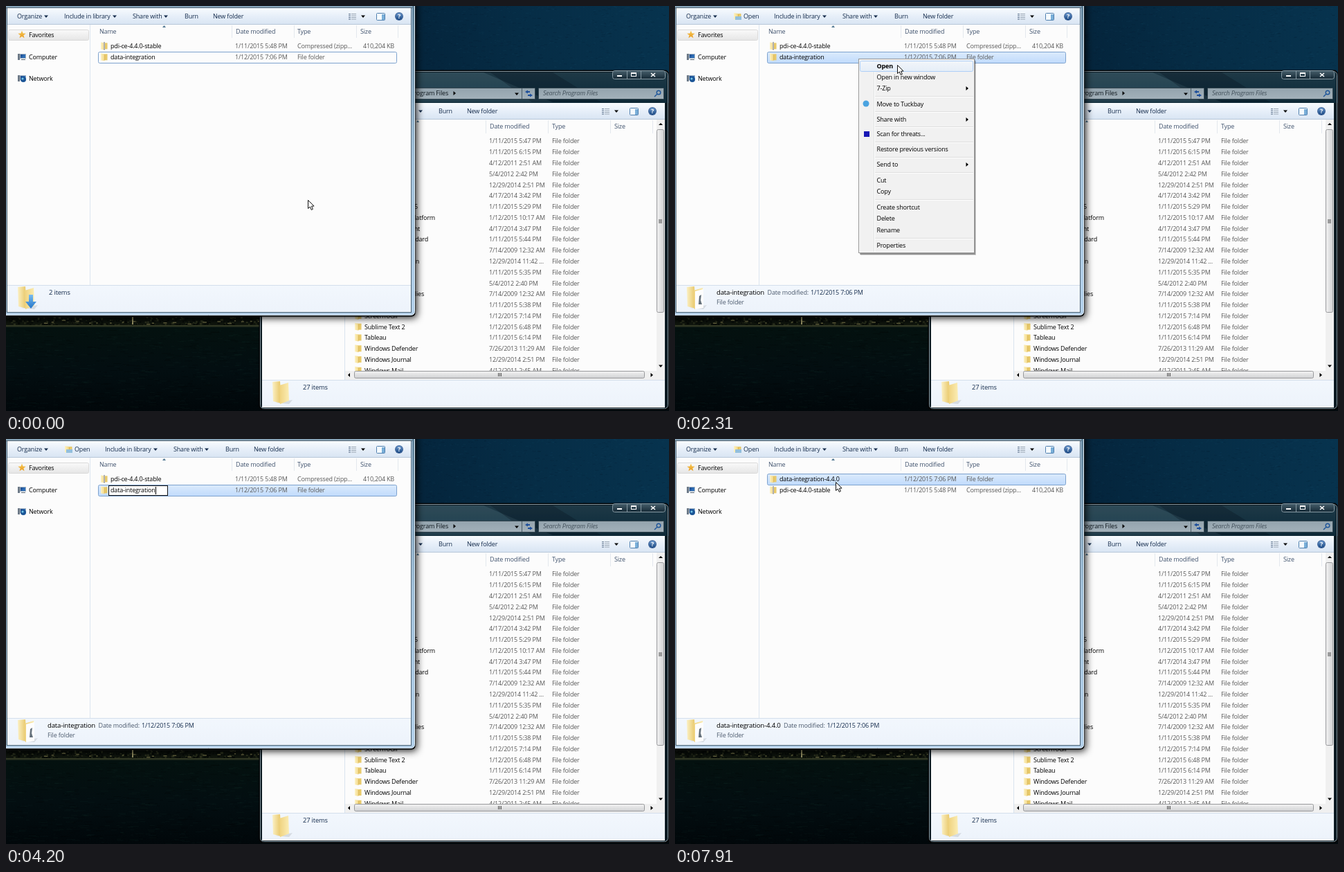
An HTML page with a canvas that plays this animation: 958 px wide and 585 px high, repeating every 8000 ms.

```html
<!DOCTYPE html>
<html lang="en">
<head>
<meta charset="utf-8">
<title>Renaming a folder</title>
<style>
html, body { margin: 0; width: 100%; height: 100%; overflow: hidden; background: #03121b; }
canvas { display: block; }
</style>
</head>
<body>
<canvas id="stage" width="958" height="585"></canvas>
<script>
const W = 958, H = 585, LOOP = 8000, STEP = 70;
const screen = document.getElementById('stage').getContext('2d');
let g = screen;

const INK = '#000', NAVY = '#152c4c', GREY = '#585858', HEAD = '#40536e';

// ---- drawing helpers ----
function box(x, y, w, h, fill) { g.fillStyle = fill; g.fillRect(x, y, w, h); }
function frame(x, y, w, h, color) { g.strokeStyle = color; g.lineWidth = 1; g.strokeRect(x + .5, y + .5, w - 1, h - 1); }
function shade(x0, y0, x1, y1, ...stops) {
  const s = g.createLinearGradient(x0, y0, x1, y1);
  stops.forEach((c, i) => s.addColorStop(i / (stops.length - 1), c));
  return s;
}
function down(x, y, w, h, ...stops) { box(x, y, w, h, shade(0, y, 0, y + h, ...stops)); }
function round(x, y, w, h, r, fill, line) {
  g.beginPath(); g.roundRect(x + .5, y + .5, w - 1, h - 1, r);
  if (fill) { g.fillStyle = fill; g.fill(); }
  if (line) { g.strokeStyle = line; g.lineWidth = 1; g.stroke(); }
}
function poly(fill, ...p) {
  g.beginPath();
  for (let i = 0; i < p.length; i += 2) g.lineTo(p[i], p[i + 1]);
  g.closePath(); g.fillStyle = fill; g.fill();
}
function disc(x, y, r, fill) { g.beginPath(); g.arc(x, y, r, 0, 7); g.fillStyle = fill; g.fill(); }
function setFont(style = '', size = 9) {
  g.font = `${style} ${size}px "Open Sans", "Noto Sans", sans-serif`;
  g.letterSpacing = '-0.18px';
}
// y is the middle of the line
function text(s, x, y, color = INK, align = 'left', style = '', size = 9) {
  setFont(style, size); g.textAlign = align; g.fillStyle = color; g.fillText(s, x, Math.round(y + 3));
}
function arrow(x, y, color = INK) { poly(color, x - 3, y - 1.5, x + 3, y - 1.5, x, y + 2); }
function arrowRight(x, y, color = INK) { poly(color, x - 1.5, y - 3, x + 2, y, x - 1.5, y + 3); }
function seeded(n) { return () => (n = n * 16807 % 2147483647) / 2147483647; }

// ---- icons ----
function folder(x, y, w = 10, h = 11) {
  box(x + w * .45, y + 1, w * .5, h - 2, shade(x, 0, x + w, 0, '#f7e294', '#e5c460'));
  poly(shade(x, 0, x + w * .6, 0, '#fdf3c6', '#f0d27a'), x, y, x + w * .55, y + h * .1, x + w * .55, y + h, x, y + h * .92);
  box(x + w * .55, y + 2, .7, h - 3, '#cda544');
}
function zip(x, y) {
  folder(x, y);
  box(x + 4, y, 2, 11, '#77797c');
  for (let i = 0; i < 5; i++) box(x + 4, y + 1 + i * 2, 2, 1, '#e8e8e8');
}
function bigFolder(x, y) {
  poly('rgba(0,0,0,.1)', x + 4, y + 31, x + 29, y + 27, x + 24, y + 33);
  poly(shade(x, 0, x + 12, 0, '#fbf0c4', '#e8c768'), x, y + 1, x + 11, y, x + 13, y + 32, x + 1, y + 29);
  poly(shade(x + 9, 0, x + 24, 0, '#eed07a', '#fbedb4'), x + 10, y + 6, x + 23, y + 2, x + 24, y + 28, x + 11, y + 33);
}
function star(x, y) {
  const p = [];
  for (let i = 0; i < 10; i++) {
    const r = i % 2 ? 2.5 : 6, a = i * Math.PI / 5 - Math.PI / 2;
    p.push(x + r * Math.cos(a), y + r * Math.sin(a));
  }
  poly(shade(0, y - 6, 0, y + 6, '#f6c64b', '#e89a25'), ...p);
}
function monitor(x, y) {
  box(x, y, 3, 9, '#6d7a88');
  box(x + 3, y, 9, 7, '#a5b4c2');
  box(x + 4, y + 1, 7, 5, shade(x, y, x + 8, y + 5, '#0a2766', '#2f6fb8'));
  box(x + 5, y + 8, 6, 1, '#5c6874');
}
function toolIcons(x, y) {
  for (let i = 0; i < 4; i++) {
    box(x - 21, y - 4 + i * 2.5, 3, 1.2, '#71849b');
    box(x - 17, y - 4 + i * 2.5, 7, 1, '#9ba7b4');
  }
  arrow(x, y);
  round(x + 19, y - 5, 13, 11, 1, '#f5fbff', '#4f7fae');
  box(x + 27, y - 3, 4, 8, '#79aed8');
  disc(x + 52, y, 6, '#43679a');
  disc(x + 52, y, 5, shade(0, y - 5, 0, y + 5, '#6e9bd0', '#164681'));
  text('?', x + 52, y, '#fff', 'center', 'bold');
}
function pointer(x, y) {
  g.save(); g.translate(x + .5, y + .5); g.beginPath();
  [[0, 0], [0, 12], [2.8, 9.5], [4.8, 14], [6.8, 13], [5, 8.7], [8.6, 8.5]].forEach(p => g.lineTo(...p));
  g.closePath();
  g.fillStyle = '#fff'; g.fill();
  g.strokeStyle = '#111'; g.lineWidth = 1; g.stroke();
  g.restore();
}

// ---- desktop and rear window ----
function desktop() {
  const rnd = seeded(77);
  box(0, 0, W, H, '#02090d');
  box(560, 0, 398, 140, shade(570, 100, 958, 0, '#04233a', '#062d46', '#07334e'));
  for (let i = 0; i < 700; i++)
    box(585 + rnd() * 373, rnd() * 94, 2 + rnd() * 3, 1, rnd() < .5 ? 'rgba(0,12,25,.12)' : 'rgba(50,130,165,.06)');
  down(0, 440, 400, 22, '#020404', '#070c08', '#12180f');
  for (let i = 0; i < 330; i++)
    box(rnd() * 370, 449 + rnd() * 12, 1 + rnd() * 3, 1 + rnd() * 2, rnd() < .65 ? '#050906' : '#2a2f1c');
  for (let x = 55; x < 366; x += 7 + rnd() * 15) box(x, 453 + rnd() * 6, 2 + rnd() * 4, 1.5, '#5f5d3b');
  box(182, 449, 2, 11, '#928d62');
  down(0, 461, 370, 3, '#3d4229', '#161f17');
  down(0, 464, 370, 121, '#04110f', '#030e11', '#01070a');
  for (let i = 0; i < 700; i++)
    box(rnd() * 370, 466 + rnd() * 119, 3 + rnd() * 10, 1, rnd() < .5 ? 'rgba(0,2,4,.25)' : 'rgba(30,62,56,.13)');
}

const dates = ['1/11/2015 5:47 PM', '1/11/2015 6:15 PM', '4/12/2011 2:51 AM', '5/4/2012 2:42 PM',
  '12/29/2014 2:51 PM', '4/17/2014 3:42 PM', '1/11/2015 5:29 PM', '1/12/2015 10:17 AM', '4/17/2014 3:47 PM',
  '1/11/2015 5:44 PM', '7/14/2009 12:32 AM', '12/29/2014 11:42 ...', '1/11/2015 5:35 PM', '5/4/2012 2:40 PM',
  '7/14/2009 12:32 AM', '1/11/2015 5:38 PM', '1/12/2015 7:14 PM', '1/12/2015 6:48 PM', '1/11/2015 6:14 PM',
  '7/26/2013 11:29 AM', '12/29/2014 2:51 PM', '4/12/2011 2:45 AM'];
const lastNames = ['ScreenToGif', 'Sublime Text 2', 'Tableau', 'Windows Defender', 'Windows Journal', 'Windows Mail'];
const tails = [['5', 595, 6], ['latform', 620, 7], ['ht', 598, 8], ['dard', 610, 9], ['n', 597, 11], ['lies', 604, 14]];

function bar(x, y, w, h, vertical) {
  round(x, y, w, h, 2, vertical ? shade(x, 0, x + w, 0, '#f4f4f4', '#cfd0d2') : shade(0, y, 0, y + h, '#f4f4f4', '#cfd0d2'), '#97989b');
  for (let i = -2; i <= 2; i += 2)
    vertical ? box(x + 3, y + h / 2 + i, 5, 1, '#555') : box(x + w / 2 + i, y + 3, 1, 5, '#555');
}
function rearWindow() {
  round(365, 92, 593, 492, 5, '#030506');
  round(367, 94, 590, 488, 5, '#0c1a22', '#8798a1');
  down(369, 96, 586, 44, '#1f3946', '#143140', '#0d2836');
  poly('rgba(130,165,178,.16)', 590, 96, 690, 96, 790, 139, 590, 139);
  poly('rgba(0,10,20,.25)', 700, 96, 790, 96, 860, 139, 760, 139);
  round(876, 93, 77, 13, 3, shade(0, 93, 0, 106, '#4a626f', '#132733'), '#8598a2');
  box(897, 94, 1, 11, '#8598a2'); box(917, 94, 1, 11, '#8598a2');
  box(883, 100, 7, 2, '#fff');
  frame(903, 97, 8, 5, '#fff'); box(903, 96, 8, 1, '#fff');
  g.strokeStyle = '#fff'; g.lineWidth = 1.6; g.beginPath();
  g.moveTo(932, 97); g.lineTo(938, 102); g.moveTo(938, 97); g.lineTo(932, 102); g.stroke();

  const field = shade(0, 118, 0, 135, '#93a3ad', '#a3b1ba');
  round(500, 118, 265, 17, 1, field, '#33454f');
  box(745, 119, 1, 15, '#4a5c67');
  text('Program Files', 639, 126, '#0c151b', 'right'); arrowRight(648, 126); arrow(738, 127);
  for (const [x, y, s] of [[754, 124, -1], [757, 129, 1]])
    poly('#1d4f9c', x + s * 4, y, x, y - 2.5, x, y - 1, x - s * 3, y - 1, x - s * 3, y + 1, x, y + 1, x, y + 2.5);
  round(769, 118, 182, 17, 1, field, '#33454f');
  text('Search Program Files', 776, 126, '#45535d', 'left', 'italic');
  g.strokeStyle = '#1f569a'; g.lineWidth = 1.4; g.beginPath(); g.arc(943, 125, 2.8, 0, 7);
  g.moveTo(941, 127); g.lineTo(937, 131); g.stroke();

  box(370, 140, 582, 440, '#fcfcfc');
  down(370, 140, 582, 23, '#f8fbfe', '#e7eff9', '#d9e5f3');
  box(370, 163, 582, 1, '#b7c7d9');
  arrow(599, 152, NAVY); text('Burn', 625, 152, NAVY); text('New folder', 666, 152, NAVY);
  toolIcons(882, 152);
  box(489, 164, 1, 376, '#d9e3ee');
  for (const x of [693, 783, 873, 934]) box(x, 165, 1, 19, '#e3e8ee');
  poly('#4e7590', 593, 168, 595, 165, 597, 168);
  text('Date modified', 699, 174, HEAD); text('Type', 789, 174, HEAD); text('Size', 879, 174, HEAD);
  g.save(); g.beginPath(); g.rect(490, 164, 450, 363); g.clip();
  dates.forEach((d, i) => {
    const y = 195.4 + i * 15.78;
    text(d, 698, y, GREY); text('File folder', 789, y, GREY);
    if (i > 15) { folder(504, y - 6); text(lastNames[i - 16], 518, y); }
  });
  tails.forEach(([s, x, i]) => text(s, x, 195.4 + i * 15.78, INK, 'right'));
  g.restore();

  box(940, 164, 12, 363, '#f0f0f0'); bar(940, 178, 11, 265, true);
  poly(INK, 943, 172, 949, 172, 946, 169); arrow(946, 520);
  box(490, 527, 462, 13, '#f0f0f0'); bar(503, 527, 420, 11);
  poly(INK, 497, 530, 497, 536, 494, 533); arrowRight(933, 533);
  down(370, 540, 582, 39, '#f2f7fd', '#edf3fb'); box(370, 540, 582, 1, '#d4dfec');
  bigFolder(385, 542); text('27 items', 429, 551, NAVY, 'left', '', 9.4);
}

// ---- front window ----
function frontFrame() {
  g.save(); g.shadowColor = 'rgba(0,0,0,.9)'; g.shadowBlur = 11; g.shadowOffsetX = 2; g.shadowOffsetY = 2;
  round(-8, -8, 600, 457, 5, '#04080b'); g.restore();
  round(-8, -8, 599, 455, 5, '#b4cfe8', '#e3eef7');
  box(587, 0, 3, 443, shade(0, 0, 0, 443, '#5d7f96', '#9dbdd6', '#b2d0eb'));
  box(0, 0, 587, 1, '#7595ab'); box(0, 1, 587, 1, '#a4bdce'); box(0, 2, 587, 1, '#3f5463');
  box(0, 3, 1, 440, '#9fb9cd'); box(1, 3, 1, 440, '#4b6070');
  box(2, 3, 584, 440, '#fcfcfc'); box(585, 3, 1, 440, '#4a6375');
  box(2, 442, 584, 1, '#4a6375');
  down(2, 3, 583, 23, '#f8fbfe', '#e7eff9', '#d9e5f3'); box(2, 26, 583, 1, '#b7c7d9');
  toolIcons(516, 15);
  box(121, 27, 1, 376, '#dce5ef');
  round(3, 34, 117, 16, 2, shade(0, 34, 0, 50, '#fafafa', '#e5e5e5'), '#d9d9d9');
  star(23, 41.5); text('Favorites', 33, 42);
  monitor(17, 69); text('Computer', 33, 74);
  monitor(17, 100); disc(25, 106, 4, '#1b5596'); disc(24, 105, 1.6, '#75c7e8'); text('Network', 33, 105);
  poly('#4e7590', 226, 31, 228.5, 28, 231, 31);
  [['Name', 135], ['Date modified', 332], ['Type', 421], ['Size', 512]].forEach(([s, x]) => text(s, x, 37, HEAD));
  for (const x of [326, 416, 506, 566]) box(x, 28, 1, 18, '#e3e8ee');
  down(2, 403, 583, 39, '#f2f7fd', '#edf3fb'); box(2, 403, 583, 1, '#d4dfec');
}
function toolbar(open) {
  const dx = open ? 59 : 0;
  text('Organize', 16, 15, NAVY); arrow(58, 15, NAVY);
  if (open) { folder(85, 10, 11, 10); box(87, 15, 9, 5, '#93bfdc'); text('Open', 99, 15, NAVY); }
  text('Include in library', 84 + dx, 15, NAVY); arrow(157 + dx, 15, NAVY);
  text('Share with', 183 + dx, 15, NAVY); arrow(231 + dx, 15, NAVY);
  text('Burn', 258 + dx, 15, NAVY); text('New folder', 299 + dx, 15, NAVY);
}
function details(name) {
  bigFolder(17, 405);
  if (!name) {
    poly(shade(0, 417, 0, 437, '#7abdf0', '#2475c8'), 33, 417, 39, 417, 39, 427, 44, 427, 36, 437, 28, 427, 33, 427);
    return text('2 items', 62, 414, NAVY, 'left', '', 9.4);
  }
  poly('#fdfdfd', 29, 412, 41, 409, 41, 436, 29, 438);
  poly('#65717b', 35, 419, 38, 417, 37, 425, 39, 431, 34, 431);
  text(name, 60, 414, INK, 'left', '', 9.6);
  let x = 64.5 + g.measureText(name).width;
  text('Date modified:', x, 414, '#4d5b6e');
  x += g.measureText('Date modified:').width + 3;
  text('1/12/2015 7:06 PM', x, 414, NAVY);
  text('File folder', 60, 428, '#4d5b6e');
}
const rowTop = i => 50 + 16 * i;
function rowBack(i, look) {
  const y = rowTop(i);
  if (look === 'picked') round(133, y, 432, 17, 2, shade(0, y, 0, y + 16, '#dcebfc', '#c1dbfc'), '#7da2ce');
  if (look === 'hover') round(133, y, 432, 17, 2, shade(0, y, 0, y + 16, '#fafbfd', '#ebf3fd'), '#b8d6fb');
  if (look === 'focus') round(133, y, 432, 17, 2, null, '#7da2ce');
}
function row(i, name, zipped) {
  const y = rowTop(i) + 8.3;
  zipped ? zip(137, y - 6) : folder(137, y - 6);
  text(name, 151, y);
  text(zipped ? '1/11/2015 5:48 PM' : '1/12/2015 7:06 PM', 331, y, GREY);
  text(zipped ? 'Compressed (zipp...' : 'File folder', 421, y, GREY);
  if (zipped) text('410,204 KB', 561, y, GREY, 'right');
}
function editor(name, selected, caret) {
  setFont();
  const w = g.measureText(name).width;
  box(148, 67, Math.round(w + 21), 15, '#fff');
  frame(148, 67, Math.round(w + 21), 15, '#111');
  if (selected) box(151, 69, w, 11, '#3399ff');
  text(name, 151, 74.3, selected ? '#fff' : INK);
  if (caret) box(Math.round(151 + w), 69, 1, 11, '#000');
}

// ---- context menu ----
const items = [['Open', 87], ['Open in new window', 103], ['7-Zip', 119, 1], ['Move to Tuckbay', 142], ['Share with', 164, 1],
  ['Scan for threats...', 185], ['Restore previous versions', 207], ['Send to', 229, 1], ['Cut', 252], ['Copy', 268],
  ['Create shortcut', 291], ['Delete', 307], ['Rename', 324], ['Properties', 346]];
function menu(alpha, py) {
  g.save(); g.globalAlpha = alpha;
  box(268, 79, 167, 281, 'rgba(0,0,0,.18)'); box(267, 78, 167, 281, 'rgba(0,0,0,.3)');
  box(265, 76, 168, 281, '#f1f1f1'); frame(265, 76, 168, 281, '#979797'); frame(266, 77, 166, 279, '#f8f8f8');
  box(287, 78, 1, 277, '#e2e3e3'); box(288, 78, 1, 277, '#fff');
  for (const y of [130, 152, 174, 196, 218, 240, 279, 335]) { box(289, y, 142, 1, '#dedede'); box(289, y + 1, 142, 1, '#fff'); }
  items.forEach(([s, y, sub], i) => {
    if (py > 78 && Math.abs(py - y) <= 8)
      round(267, y - 8, 164, 16, 2, shade(0, y - 8, 0, y + 8, '#f3f6fa', '#e4edf7'), '#aecff7');
    text(s, 291.5, y, INK, 'left', i ? '' : 'bold');
    if (sub) arrowRight(422, y);
  });
  disc(276, 141, 4.5, '#4aa3e0');
  box(273, 181, 8, 8, '#1717b5');
  g.restore();
}

// ---- timeline ----
const path = [[0, 436, 280], [210, 430, 274], [490, 352, 180], [770, 282, 92], [980, 266, 77], [2170, 266, 77],
  [2310, 321, 85], [2520, 326, 165], [2730, 325, 285], [2870, 324, 317], [3150, 324, 317], [3360, 296, 205],
  [3500, 260, 90], [3570, 250, 62], [3640, 243, 62], [3710, 238, 70], [7700, 238, 70], [7910, 232, 62]];
const typing = [4970, 5460, 5670, 5950, 6160, 6720];
function mouse(t) {
  const i = path.findIndex(p => p[0] > t);
  if (i < 0) return path.at(-1).slice(1);
  const [t0, x0, y0] = path[i - 1], [t1, x1, y1] = path[i], k = (t - t0) / (t1 - t0);
  return [Math.round(x0 + (x1 - x0) * k), Math.round(y0 + (y1 - y0) * k)];
}
const between = (t, a, b) => t >= a && t < b;

function layer() {
  const c = new OffscreenCanvas(W, H);
  g = c.getContext('2d');
  desktop(); rearWindow(); frontFrame();
  g = screen;
  return c;
}
function draw(t, base) {
  g.drawImage(base, 0, 0);
  const [mx, my] = mouse(t), shown = t < 3920 || t >= 7700, done = t >= 7140, menuOn = between(t, 1960, 3220);
  const typed = typing.filter(k => k <= t).length;
  const name = 'data-integration' + '-4.4.0'.slice(0, typed);
  const own = done ? 0 : 1;
  const over = shown && !menuOn && mx < 564 ? (between(my, 50, 66) ? 0 : between(my, 66, 82) ? 1 : -1) : -1;
  toolbar(t >= 1330);
  if (over >= 0 && over !== own) rowBack(over, 'hover');
  if (t >= 1260) rowBack(own, 'picked');
  else { if (over === own) rowBack(own, 'hover'); rowBack(own, 'focus'); }
  row(own, name, false);
  row(1 - own, 'pdi-ce-4.4.0-stable', true);
  details(t < 1400 ? '' : done ? name : 'data-integration');
  if (between(t, 3220, 7140))
    editor(name, t < 4130, t >= 4130 && !between(t, 4620, 4970) && !between(t, 6650, 6720));
  if (menuOn) menu(Math.min(1, (t - 1890) / 210), my);
  if (shown) pointer(mx, my);
}

const base = layer();
let last = -1;
function tick() {
  const t = Math.floor(performance.now() % LOOP / STEP) * STEP;
  if (t !== last) draw(last = t, base);
  requestAnimationFrame(tick);
}
tick();
</script>
</body>
</html>
```
